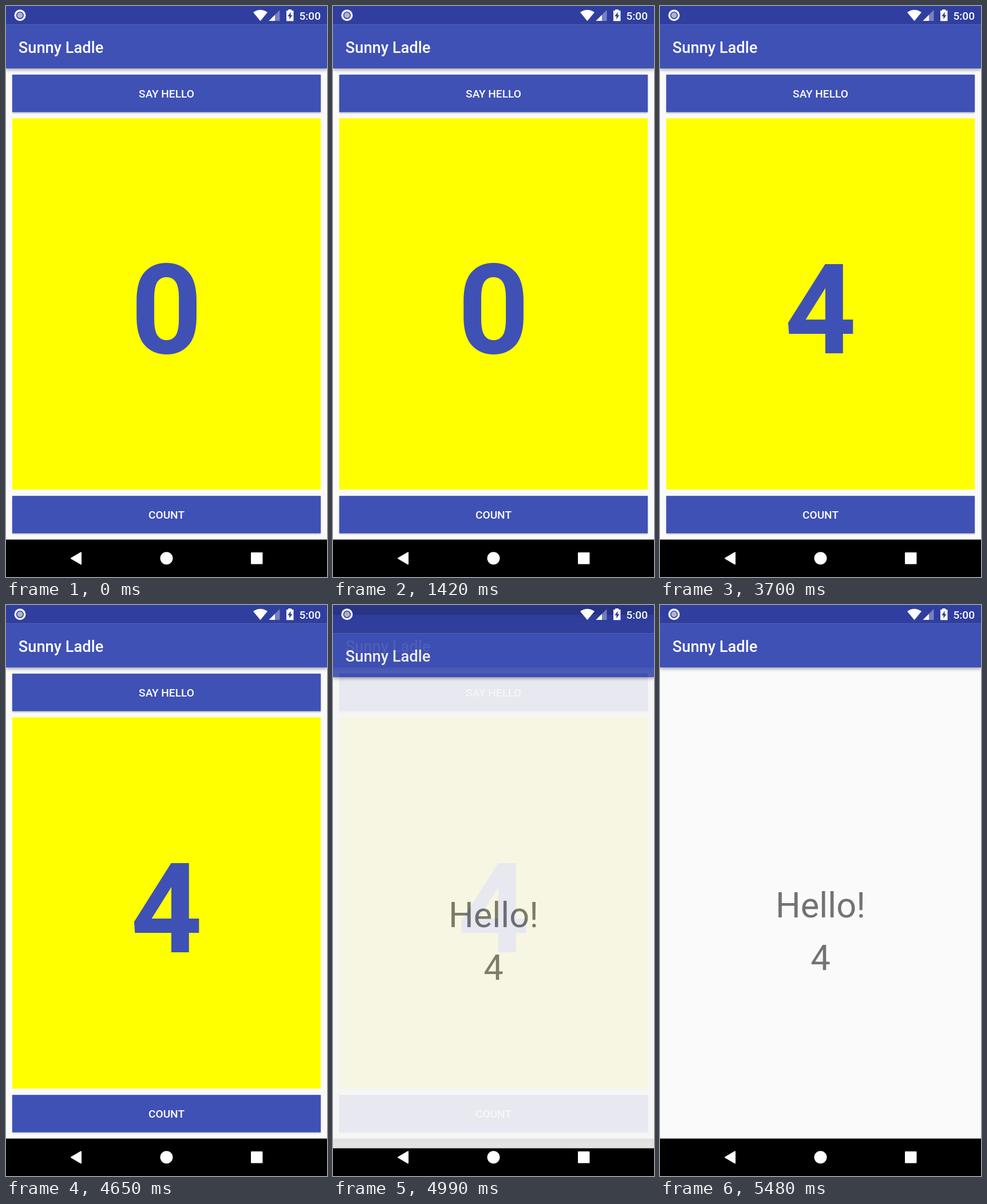
Recreate the animation shown at these times as an HTML page with a canvas. Size 561 by 998 pixels, loop 6.1 s.

```html
<!DOCTYPE html>
<html lang="en">
<head>
<meta charset="utf-8">
<title>Counter app</title>
<style>
  html, body { margin: 0; width: 100%; height: 100%; overflow: hidden; background: #000; }
  canvas { display: block; }
</style>
</head>
<body>
<canvas id="stage" width="561" height="998"></canvas>
<script>
const W = 561, H = 998, LOOP = 6100;
const DP = W / 411.43;
const BAR_TOP = 24 * DP, BAR_END = 80 * DP, NAV_TOP = H - 48 * DP;
const EDGE = 8 * DP, BUTTON_H = 48 * DP;
const PRIMARY = '#3f51b5', DARK = '#303f9f', PAPER = '#fafafa';
const TITLE = 'Sunny Ladle';

// Times at which the counter goes up, and [start, end] of each press
const COUNTS = [1990, 3110, 3280, 3530];
const PRESSES = [[1910, 2080], [3070, 3280], [3490, 3700]];
const OPEN = 4940, OPEN_LENGTH = 290, OPEN_END = 5190;

const stage = document.getElementById('stage').getContext('2d');

function makeLayer() {
  const canvas = document.createElement('canvas');
  canvas.width = W;
  canvas.height = H;
  return canvas.getContext('2d');
}
const mainLayer = makeLayer(), helloLayer = makeLayer();

function text(c, str, x, y, size, weight, color, align = 'center') {
  c.font = `${weight} ${size}px Roboto, sans-serif`;
  c.textAlign = align;
  c.fillStyle = color;
  c.fillText(str, x, y);
}

function raisedRect(c, x, y, w, h, lift) {
  c.save();
  c.shadowColor = 'rgba(0,0,0,.32)';
  c.shadowBlur = 3 + lift * 4;
  c.shadowOffsetY = 1.5 + lift * 2;
  c.fillStyle = PRIMARY;
  c.fillRect(x, y, w, h);
  c.restore();
}

function polygon(c, color, ...points) {
  c.fillStyle = color;
  c.beginPath();
  points.forEach(([x, y]) => c.lineTo(x, y));
  c.closePath();
  c.fill();
}

function disc(c, x, y, r, color) {
  c.fillStyle = color;
  c.beginPath();
  c.arc(x, y, r, 0, Math.PI * 2);
  c.fill();
}

function drawFrame(c) {
  c.fillStyle = PAPER;
  c.fillRect(0, 0, W, NAV_TOP);
  raisedRect(c, 0, BAR_TOP, W, BAR_END - BAR_TOP, 0.5);
  c.fillStyle = DARK;
  c.fillRect(0, 0, W, BAR_TOP);
  text(c, TITLE, 16 * DP, 81.5, 20 * DP, 500, '#fff', 'left');
}

function drawButton(c, label, y, lift) {
  raisedRect(c, EDGE, y, W - 2 * EDGE, BUTTON_H, lift);
  text(c, label, W / 2, y + 40, 14 * DP, 500, '#fff');
}

function drawMain(c, count, lift) {
  const top = BAR_END + EDGE, low = NAV_TOP - EDGE - BUTTON_H;
  const panel = top + BUTTON_H + EDGE;
  c.clearRect(0, 0, W, H);
  drawFrame(c);
  c.fillStyle = '#ffff00';
  c.fillRect(EDGE, panel, W - 2 * EDGE, low - EDGE - panel);
  drawButton(c, 'SAY HELLO', top, 0);
  drawButton(c, 'COUNT', low, lift);
  text(c, count, W / 2, 606.5, 160 * DP, 700, PRIMARY);
}

function drawHello(c, count) {
  c.clearRect(0, 0, W, H);
  drawFrame(c);
  text(c, 'Hello!', W / 2, 545.5, 45 * DP, 400, '#737373');
  text(c, count, W / 2, 638, 45 * DP, 400, '#737373');
}

function drawStatus(c) {
  const white = '#fff', faint = 'rgba(255,255,255,.35)';
  c.strokeStyle = white;
  c.lineWidth = 3.4;
  c.beginPath();
  c.arc(24.5, 16.3, 8.3, 0, Math.PI * 2);
  c.stroke();
  disc(c, 24.5, 16.3, 5, 'rgba(255,255,255,.6)');

  c.fillStyle = white;
  c.beginPath();
  c.moveTo(444.5, 26.3);
  c.lineTo(432, 11);
  c.quadraticCurveTo(444.5, 2.5, 457, 11);
  c.fill();

  polygon(c, faint, [459.5, 26], [478.5, 26], [478.5, 7]);
  polygon(c, white, [459.5, 26], [470, 26], [470, 15.5]);

  c.fillStyle = white;
  c.fillRect(490, 8, 12.5, 18.3);
  c.fillRect(493.2, 6, 6, 3);
  polygon(c, DARK, [497.6, 10.5], [492.3, 18], [495.4, 18], [495.4, 23.5], [500.4, 16], [497.6, 16]);

  text(c, '5:00', 550, 23.8, 14 * DP, 500, white, 'right');
}

function drawNav(c) {
  c.lineJoin = 'round';
  c.lineWidth = 2;
  c.strokeStyle = '#fff';
  polygon(c, '#fff', [114, 965.3], [131, 955.3], [131, 975.3]);
  c.stroke();
  disc(c, 280.5, 965.3, 11, '#fff');
  polygon(c, '#fff', [429, 956], [447.5, 956], [447.5, 974.5], [429, 974.5]);
  c.stroke();
}

function paste(layer, alpha, y) {
  stage.globalAlpha = alpha;
  stage.drawImage(layer.canvas, 0, y);
  stage.globalAlpha = 1;
}

function pressLift(t) {
  const press = PRESSES.find(([a, b]) => t >= a && t < b);
  if (!press) return 0;
  return Math.sin(Math.PI * (t - press[0] + 20) / (press[1] - press[0] + 20));
}

function render(t) {
  const count = COUNTS.filter(at => t >= at).length;
  stage.fillStyle = '#000';
  stage.fillRect(0, 0, W, H);

  // The second screen slides up and fades in while the first one dims
  const left = t >= OPEN_END ? 0 : 1 - (t - OPEN) / OPEN_LENGTH;
  if (t < OPEN_END) {
    drawMain(mainLayer, count, pressLift(t));
    paste(mainLayer, t < OPEN ? 1 : 0.7 + 0.2 * left ** 2, 0);
  }
  if (t >= OPEN) {
    drawHello(helloLayer, count);
    paste(helloLayer, 1 - 0.2 * left ** 4, Math.round(25 * left ** 2));
  }
  drawStatus(stage);
  drawNav(stage);
}

const start = performance.now();
function tick() {
  render((performance.now() - start) % LOOP);
  requestAnimationFrame(tick);
}
tick();
</script>
</body>
</html>
```
